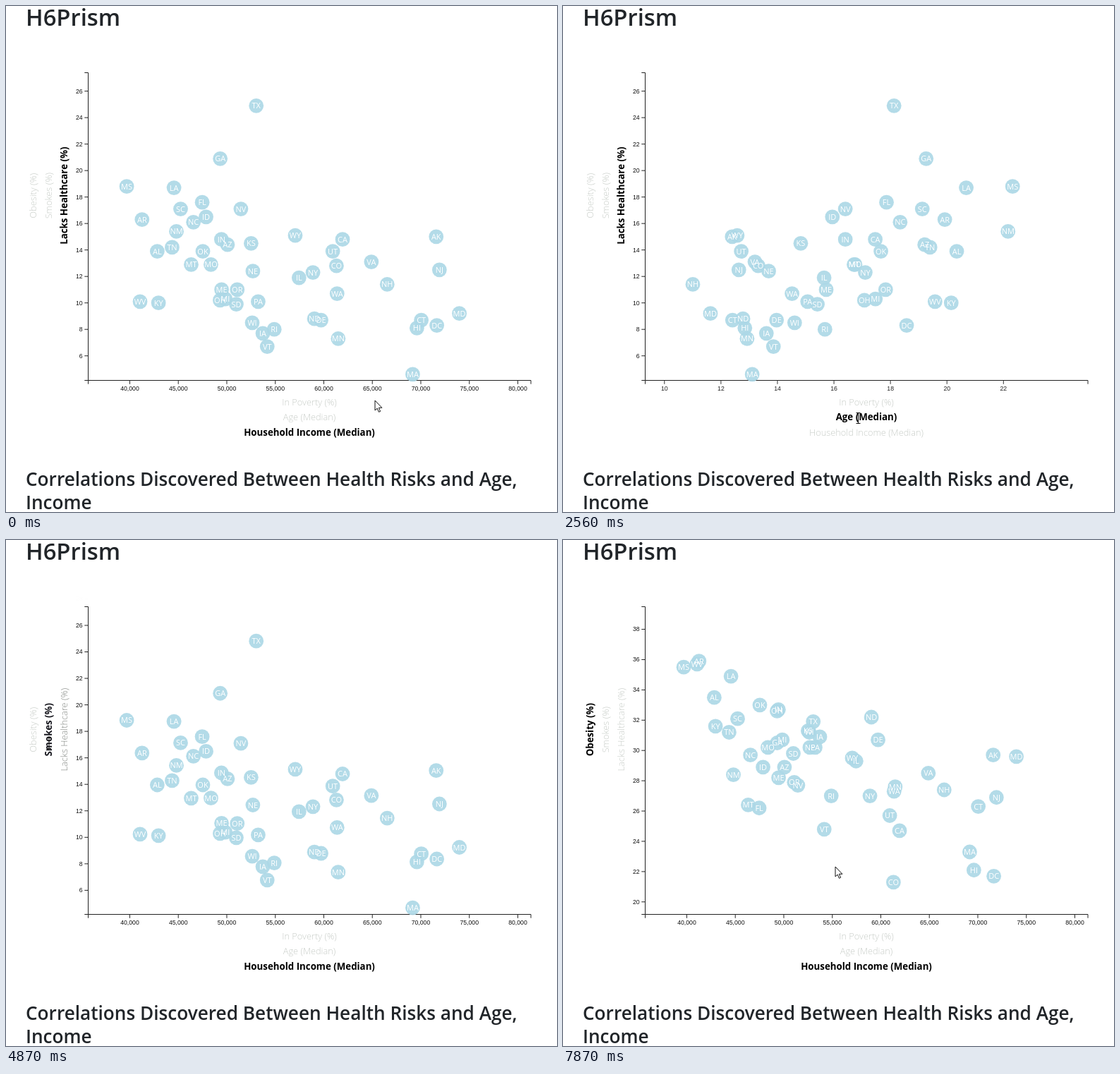
Write an HTML page that moves like this. It is 781x717 px and loops after 8000 ms.

```html
<!DOCTYPE html>
<html lang="en">
<head>
<meta charset="utf-8">
<title>Health risks</title>
<style>
html, body { margin: 0; width: 100%; height: 100%; overflow: hidden; background: #fff; }
svg { display: block; width: 781px; height: 717px; font-family: "Open Sans", "Noto Sans", sans-serif; }
.head { font-weight: 600; fill: #212529; }
.axis { stroke: #222; fill: none; }
.tick text { font: 8.7px "Liberation Sans", Arial, sans-serif; fill: #111; }
.dot circle { fill: #add8e6; opacity: .92; }
.name { font-size: 11px; fill: #fff; text-anchor: middle; }
.label { text-anchor: middle; }
</style>
</head>
<body>
<svg id="stage" viewBox="0 0 781 717">
  <defs><clipPath id="chart"><rect y="48" width="781" height="600"/></clipPath></defs>
  <text class="head" x="28" y="27.5" font-size="32.8">H6Prism</text>
  <text class="head" x="28" y="680" font-size="26.2">Correlations Discovered Between Health Risks and Age,</text>
  <text class="head" x="28" y="713.3" font-size="26.2">Income</text>
  <g clip-path="url(#chart)">
    <g id="ticks"></g>
    <path class="axis" d="M116.5 535.7V530.5H744V535.7M111.3 94.5H116.5V530.5H111.3"/>
    <g id="dots" class="dot"></g>
    <g id="names"></g>
    <g id="labels"></g>
  </g>
  <g id="cursor" stroke-width="1" stroke-linejoin="round"></g>
</svg>
<script>
const LOOP = 8000, MOVE = 1000, FADE = 180;
const X0 = 116.5, Y0 = 530.6, W = 627.8, H = 436;
const $ = id => document.getElementById(id);
const lerp = (a, b, k) => a + (b - a) * k;
const clamp = (v, a, b) => Math.max(a, Math.min(b, v));
const cubic = k => k < .5 ? 4 * k ** 3 : 1 - 4 * (1 - k) ** 3;

function add(parent, tag, attrs = {}, text = '') {
  const el = document.createElementNS('http://www.w3.org/2000/svg', tag);
  for (const key in attrs) el.setAttribute(key, attrs[key]);
  if (text) el.textContent = text;
  return parent.appendChild(el);
}

const states = ('AL AK AZ AR CA CO CT DE DC FL GA HI ID IL IN IA KS KY LA ME MD MA MI MN MS MO ' +
  'MT NE NV NH NJ NM NY NC ND OH OK OR PA RI SC SD TN TX UT VT VA WA WV WI WY').split(' ');

// A measure: its values, its padded range and its tick values.
function measure(vals, first, last, step) {
  const lo = Math.min(...vals) * .9, hi = Math.max(...vals) * 1.1, ticks = [];
  for (let v = first; v <= last; v += step) ticks.push(v);
  return { vals, ticks, at: v => (v - lo) / (hi - lo) };
}

const income = measure([
  42830, 71583, 50068, 41262, 61933, 61303, 70048, 59716, 71648, 47463, 49321, 69592, 47861,
  57444, 49446, 53712, 52504, 42958, 44555, 49462, 73971, 69160, 49847, 61481, 39680, 48363,
  46328, 52686, 51450, 66532, 71919, 44803, 58878, 46556, 59029, 49308, 47529, 51075, 53234,
  54891, 45238, 50979, 44361, 53035, 60922, 54166, 64902, 61366, 41059, 52622, 57055
], 40000, 80000, 5000);
const poverty = measure([
  19.3, 11.2, 18.2, 18.9, 16.4, 12, 10.8, 12.5, 17.7, 16.5, 18.3, 11.4, 14.8,
  14.4, 15.2, 12.2, 13.6, 19.1, 19.8, 14.1, 10.1, 11.6, 16.2, 11.5, 21.5, 15.5,
  15.4, 12.4, 15.2, 9.2, 11.1, 21.3, 15.9, 17.2, 11.5, 15.8, 16.6, 16.6, 13.6,
  14.3, 18, 14.2, 18.3, 17.2, 11.7, 12.2, 11.8, 13.2, 18.3, 13.2, 11.2
], 10, 22, 2);
const age = measure([
  38.6, 33.3, 36.9, 37.8, 36, 36.3, 40.5, 39.6, 33.8, 41.6, 36.1, 38.1, 35.9,
  37.5, 37.4, 38.2, 36.2, 38.5, 36.1, 44.1, 38.3, 39.4, 39.6, 37.8, 36.7, 38.5,
  39.6, 36.2, 37.4, 42.5, 39.4, 37.2, 38.2, 38.3, 35.1, 39.4, 36.2, 39.3, 40.7,
  39.8, 38.8, 36.6, 38.6, 34.3, 30.5, 42.8, 37.7, 37.5, 41.9, 39.2, 36.6
], 28, 48, 2);
const health = measure([
  13.9, 15, 14.4, 16.3, 14.8, 12.8, 8.7, 8.7, 8.3, 17.6, 20.9, 8.1, 16.5,
  11.9, 14.8, 7.7, 14.5, 10, 18.7, 11, 9.2, 4.6, 10.3, 7.3, 18.8, 12.9,
  12.9, 12.4, 17.1, 11.4, 12.5, 15.4, 12.3, 16.1, 8.8, 10.2, 13.9, 11, 10.1,
  8, 17.1, 9.9, 14.2, 24.9, 13.9, 6.7, 13.1, 10.7, 10.1, 8.5, 15.1
], 6, 26, 2);
const smokes = measure([
  21.1, 19.9, 16.5, 24.7, 12.9, 15.7, 15.4, 19.9, 16.4, 17.7, 17.4, 14.1, 15.9,
  16.5, 22.9, 18.5, 18.1, 26.2, 24, 19.3, 14.6, 14.7, 21.2, 16.3, 23, 20.6,
  19.9, 17.3, 17, 17.5, 15.1, 19.1, 14.4, 19.1, 19.9, 21, 21.1, 17, 19.9,
  16.3, 21.5, 18.6, 24.2, 14.5, 9.7, 16.4, 19.5, 15.3, 26.7, 17.4, 19.5
], 10, 28, 2);
const obesity = measure([
  33.5, 29.7, 28.9, 35.9, 24.7, 21.3, 26.3, 30.7, 21.7, 26.2, 30.5, 22.1, 28.9,
  29.3, 32.7, 30.9, 31.3, 31.6, 34.9, 28.2, 29.6, 23.3, 30.7, 27.6, 35.5, 30.2,
  26.4, 30.2, 27.7, 27.4, 26.9, 28.4, 27, 29.7, 32.2, 32.6, 33, 27.9, 30.2,
  27, 32.1, 29.8, 31.2, 31.9, 25.7, 24.8, 28.5, 27.3, 35.7, 31.2, 29.5
], 20, 38, 2);

// When each axis switches to which measure.
const xSteps = [[-MOVE, income], [950, poverty], [2298, age], [3420, income]];
const ySteps = [[-MOVE, health], [4750, smokes], [6139, obesity]];

const modes = {
  off: { rgb: [200, 205, 200], size: 12.8, weight: 300 },
  hover: { rgb: [74, 74, 94], size: 12.8, weight: 300 },
  on: { rgb: [0, 0, 0], size: 13.3, weight: 700 }
};
const labels = [
  ['In Poverty (%)', 430, 565.5, 0, [[0, 'off'], [420, 'hover'], [950, 'on'], [2298, 'off']]],
  ['Age (Median)', 430, 587, 0, [[0, 'off'], [1480, 'hover'], [2298, 'on'], [3420, 'off']]],
  ['Household Income (Median)', 430, 609, 0, [[0, 'on'], [950, 'off'], [2920, 'hover'], [3420, 'on']]],
  ['Lacks Healthcare (%)', 87, 268.7, -90, [[0, 'on'], [4750, 'off']]],
  ['Smokes (%)', 64.5, 268.7, -90, [[0, 'off'], [4400, 'hover'], [4750, 'on'], [6139, 'off']]],
  ['Obesity (%)', 42.5, 268.7, -90, [[0, 'off'], [5800, 'hover'], [6139, 'on']]]
].map(([text, x, y, turn, steps]) => ({
  steps,
  el: add($('labels'), 'text', { class: 'label', transform: `translate(${x} ${y}) rotate(${turn})` }, text)
}));

const shapes = {
  arrow: add($('cursor'), 'path', { fill: '#fff', stroke: '#111',
    d: 'M0 0V14L3.2 11.1 5.4 16.3 7.6 15.4 5.4 10.3H9.9Z' }),
  hand: add($('cursor'), 'path', { fill: '#fff', stroke: '#223',
    d: 'M-1.5 1.5Q-1.5 0 0 0T1.5 1.5V7Q1.8 6 3 6.2T4.4 7.5Q5 6.8 6 7T7.2 8.5Q8 8 8.8 8.5T9.5 10V14' +
       'Q9.5 17 8 18.5V21H-.5V19L-4.5 13.5Q-5.6 11.7 -4.6 11T-2.5 11.6L-1.5 12.8Z' }),
  beam: add($('cursor'), 'path', { fill: 'none', stroke: '#111',
    d: 'M-3 -7.5H3M0 -7.5V7.5M-3 7.5H3' })
};
// time, x, y, shape from then on
const pointer = [
  [0, 523, 559, 'arrow'], [60, 523, 559, 'arrow'], [130, 461.5, 547, 'arrow'], [260, 461.5, 547, 'arrow'],
  [420, 442, 557, 'hand'], [590, 430, 560, 'hand'], [950, 430, 560, 'beam'], [1300, 430, 560, 'beam'],
  [1420, 423, 572, 'arrow'], [1480, 420, 577, 'hand'], [1600, 418.5, 581.5, 'hand'],
  [2298, 418.5, 584, 'beam'], [2750, 418.5, 584, 'beam'], [2840, 417, 595, 'arrow'],
  [2920, 416.5, 602, 'hand'], [3030, 416.5, 607.5, 'hand'], [3420, 416.5, 607.5, 'beam'],
  [3540, 416.5, 607.5, 'arrow'], [3700, 240, 455, 'arrow'], [3860, 17, 290, 'arrow'],
  [4000, 25, 281, 'arrow'], [4150, 30, 283, 'arrow'], [4400, 57, 285, 'hand'], [4500, 61, 286, 'hand'],
  [4750, 61, 288, 'beam'], [5640, 61, 288, 'arrow'], [5800, 42, 290, 'hand'], [5850, 38.5, 291, 'hand'],
  [6139, 38.5, 293, 'beam'], [6520, 38.5, 293, 'arrow'], [6850, 150, 410, 'arrow'],
  [7100, 261.5, 463, 'arrow'], [7670, 261.5, 463, 'arrow'], [7870, 386, 463, 'arrow'], [LOOP, 386, 463, 'arrow']
];

function makeTicks(steps, horizontal) {
  const values = new Set(steps.flatMap(s => s[1].ticks));
  return [...values].map(v => {
    const el = add($('ticks'), 'g', { class: 'tick' });
    add(el, 'path', { class: 'axis', d: horizontal ? 'M0 0V5.2' : 'M0 0H-5.2' });
    add(el, 'text', horizontal ? { y: 14, 'text-anchor': 'middle' } : { x: -7.8, y: 2.9, 'text-anchor': 'end' },
      v.toLocaleString('en-US'));
    return { v, el };
  });
}
const xTicks = makeTicks(xSteps, true), yTicks = makeTicks(ySteps, false);

const dots = states.map(s => ({
  circle: add($('dots'), 'circle', { r: 10.4 }),
  name: add($('names'), 'text', { class: 'name', dy: 4 }, s)
}));

const lastIndex = (steps, t) => steps.reduce((found, s, i) => s[0] <= t ? i : found, 0);

// The blend between two measures at time t.
function blend(steps, t) {
  const i = lastIndex(steps, t);
  const to = steps[i][1], from = steps[Math.max(0, i - 1)][1];
  const k = cubic(clamp((t - steps[i][0]) / MOVE, 0, 1));
  return {
    dot: n => lerp(from.at(from.vals[n]), to.at(to.vals[n]), k),
    tick: v => lerp(from.at(v), to.at(v), k),
    alpha: v => lerp(+from.ticks.includes(v), +to.ticks.includes(v), k)
  };
}

function drawTicks(ticks, mix, place) {
  for (const { v, el } of ticks) {
    const alpha = mix.alpha(v);
    el.style.display = alpha > 0 ? '' : 'none';
    el.setAttribute('opacity', alpha);
    el.setAttribute('transform', `translate(${place(clamp(mix.tick(v), -3, 3))})`);
  }
}

function drawLabel({ el, steps }, t) {
  const i = lastIndex(steps, t), mode = modes[steps[i][1]], before = modes[steps[Math.max(0, i - 1)][1]];
  const k = clamp((t - steps[i][0]) / FADE, 0, 1);
  el.setAttribute('fill', `rgb(${mode.rgb.map((c, n) => Math.round(lerp(before.rgb[n], c, k)))})`);
  el.setAttribute('font-size', mode.size);
  el.setAttribute('font-weight', mode.weight);
}

function drawPointer(t) {
  const i = lastIndex(pointer, t), a = pointer[i], b = pointer[i + 1] || a;
  const k = b === a ? 0 : (t - a[0]) / (b[0] - a[0]);
  $('cursor').setAttribute('transform', `translate(${lerp(a[1], b[1], k)} ${lerp(a[2], b[2], k)})`);
  for (const kind in shapes) shapes[kind].style.display = kind === a[3] ? '' : 'none';
}

function draw(t) {
  const mx = blend(xSteps, t), my = blend(ySteps, t);
  drawTicks(xTicks, mx, k => `${X0 + W * k} ${Y0}`);
  drawTicks(yTicks, my, k => `${X0} ${Y0 - H * k}`);
  dots.forEach(({ circle, name }, n) => {
    const x = X0 + W * mx.dot(n), y = Y0 - H * my.dot(n);
    circle.setAttribute('cx', x);
    circle.setAttribute('cy', y);
    name.setAttribute('x', x);
    name.setAttribute('y', y);
  });
  labels.forEach(label => drawLabel(label, t));
  drawPointer(t);
}

const start = performance.now();
function frame() {
  draw((performance.now() - start) % LOOP);
  requestAnimationFrame(frame);
}
frame();
</script>
</body>
</html>
```
